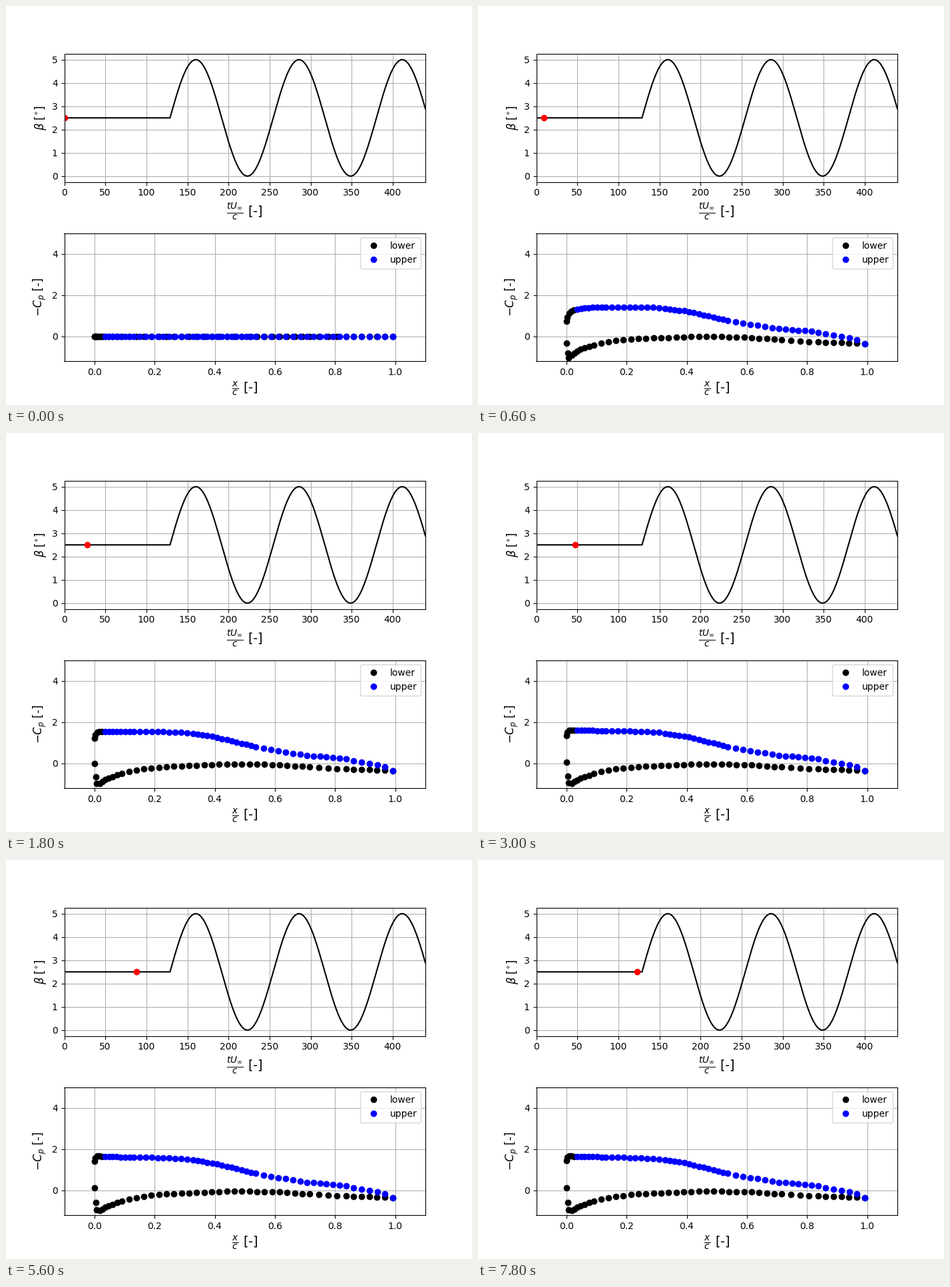
A matplotlib script that plays this animation: 700x600 px, repeating every 8 s.

```python
import numpy as np
import matplotlib.pyplot as plt
from matplotlib.animation import FuncAnimation

FRAMES = 40
STEP = np.pi             # convective time per frame
T_START = 41 * STEP      # onset of the oscillation
T_END = 140 * STEP


def through(x, knots):
    """Linear interpolation through (x, y) key points."""
    return np.interp(x, *np.transpose(knots))


# chordwise tap positions, spaced evenly between (index, x) key points
x_nose = .001 + .025 * np.linspace(0, 1, 5) ** 1.7
x_low = through(range(45), [(0, .001), (2, .008), (6, .046), (9, .092),
                            (11, .139), (34, .716), (38, .836), (44, .991)])
x_up = through(range(50), [(0, .037), (3, .073), (7, .132), (17, .327),
                           (30, .537), (36, .685), (43, .836), (49, .992)])

# settled -Cp of each surface
UPPER = [(.001, 1.45), (.004, 1.64), (.01, 1.69), (.03, 1.64), (.2, 1.59),
         (.3, 1.53), (.4, 1.31), (.55, .77), (.7, .4), (.82, .25),
         (.97, -.17), (.992, -.36)]
LOWER = [(.001, .13), (.005, -.68), (.008, -.94), (.016, -1), (.046, -.75),
         (.11, -.43), (.17, -.28), (.24, -.18), (.45, -.04), (.6, -.07),
         (.8, -.26), (.99, -.35)]


def lag(n):
    """Circulation still missing after an impulsive start."""
    return 2 / (4 + 2 * STEP * n)


def pressure(x, settled, n, base, spike, width):
    """Settled curve plus a fading deviation that peaks at the nose."""
    if n == 0:
        return np.zeros_like(x)
    fade = (lag(n) - lag(39)) / (lag(3) - lag(39))
    deviation = base * (1 - x) ** 2 + spike * np.exp(-x / width)
    return np.maximum(through(x, settled) + fade * deviation, -1.05)


def upper_cp(x, n):
    return pressure(x, UPPER, n, -.26, -.48, .02)


def lower_cp(x, n):
    return pressure(x, LOWER, n, .13, -.68, .007)


def beta(t):
    return 2.5 + 2.5 * np.sin(0.05 * np.maximum(t - T_START, 0))


fig, (top, bottom) = plt.subplots(2, 1, figsize=(7, 6), dpi=100)
fig.subplots_adjust(left=.125, right=.9, bottom=.11, top=.88, hspace=.4)

t = np.linspace(0, T_END, 1401)
top.plot(t, beta(t), 'k')
now, = top.plot([], [], 'ro')
top.set(xlim=(0, T_END), ylim=(-.25, 5.25), yticks=range(6))
top.set_xlabel(r'$\frac{tU_\infty}{c}$ [-]', fontsize=14)
top.set_ylabel(r'$\beta$ [$^{\circ}$]', fontsize=12)
top.grid()

lower, = bottom.plot([], [], 'ko', label='lower')
upper, = bottom.plot([], [], 'bo', label='upper')
bottom.set(xlim=(-.1, 1.1), ylim=(-1.2, 5), yticks=[0, 2, 4])
bottom.set_xlabel(r'$\frac{x}{c}$ [-]', fontsize=14)
bottom.set_ylabel(r'$-C_p$ [-]', fontsize=12)
bottom.grid()
bottom.legend(loc='upper right')


def update(n):
    time = n * STEP
    now.set_data([time], [beta(time)])
    # the nose taps of the upper side belong to the black series
    lower.set_data(np.append(x_low, x_nose),
                   np.append(lower_cp(x_low, n), upper_cp(x_nose, n)))
    upper.set_data(x_up, upper_cp(x_up, n))
    return now, lower, upper


anim = FuncAnimation(fig, update, frames=FRAMES, interval=200,
                     repeat=True, repeat_delay=0)
plt.show()
```
